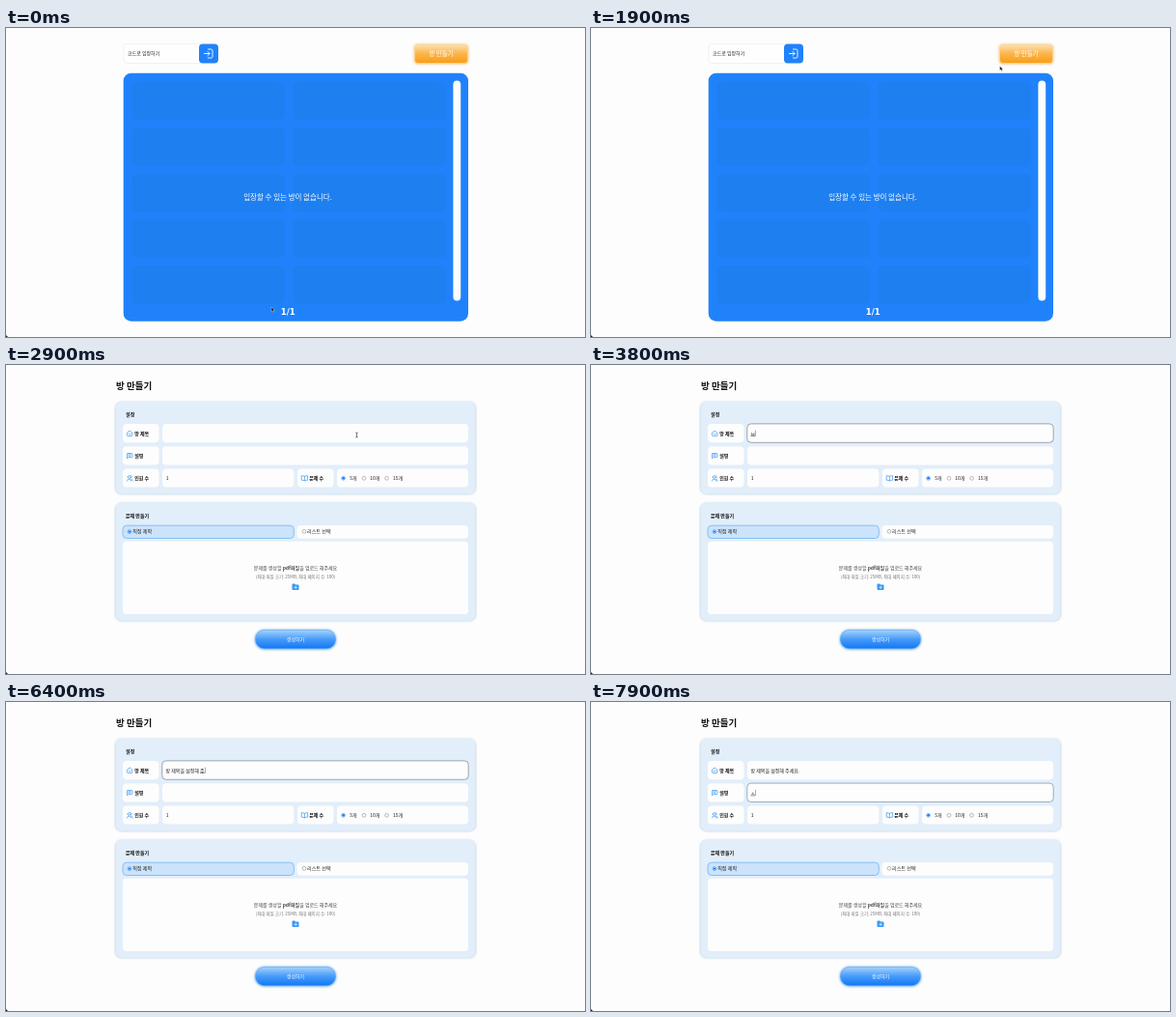
An HTML page that plays this animation: 600x320 px, repeating every 8000 ms.

```html
<!DOCTYPE html>
<html>
<head>
<meta charset="utf-8">
<style>
html, body { margin: 0; width: 100%; height: 100%; overflow: hidden; background: #fdfdfd; }
svg { display: block; width: 600px; height: 320px; }
text { font-family: "Noto Sans CJK KR", "Noto Sans CJK", "Noto Sans CJK JP", sans-serif; white-space: pre; }
</style>
</head>
<body>
<svg id="stage" viewBox="0 0 600 320">
  <defs>
    <linearGradient id="orange" x2="0" y2="1">
      <stop offset="0" stop-color="#fde0b0"/><stop offset=".45" stop-color="#fbb750"/><stop offset="1" stop-color="#f99c12"/>
    </linearGradient>
    <linearGradient id="blue" x2="0" y2="1">
      <stop offset="0" stop-color="#a5d2fc"/><stop offset=".5" stop-color="#469bf9"/><stop offset="1" stop-color="#1277f5"/>
    </linearGradient>
    <filter id="soft" x="-20%" y="-30%" width="140%" height="160%"><feGaussianBlur stdDeviation="1"/></filter>
  </defs>
  <g id="lobby"></g>
  <g id="form"></g>
  <g id="typed"></g>
  <path id="arrow" d="M0 0V4.6L1.1 3.7 1.9 5.3 2.7 4.9 2 3.4H3.4Z" fill="#111" stroke="#fff" stroke-width=".35"/>
  <path id="beam" d="M362.3 70q1.2 0 1.2 .7q0-.7 1.2-.7M363.5 70.7V74.3M362.3 75q1.2 0 1.2-.7q0 .7 1.2 .7" fill="none" stroke="#222" stroke-width=".6"/>
  <path d="M0 317.5Q.2 319.8 2.5 320H0Z"/>
</svg>
<script>
const $ = id => document.getElementById(id);
const box = (x, y, w, h, r, fill, more = '') =>
  `<rect x="${x}" y="${y}" width="${w}" height="${h}" rx="${r}" fill="${fill}" ${more}/>`;
// y is the vertical middle of the line
const label = (x, y, size, str, fill = '#222', weight = 400, anchor = 'start') =>
  `<text x="${x}" y="${y + size * .36}" font-size="${size}" fill="${fill}" font-weight="${weight}" text-anchor="${anchor}">${str}</text>`;
const icon = (x, y, d, color = '#3a96f3', width = .7) =>
  `<path transform="translate(${x} ${y})" d="${d}" fill="none" stroke="${color}" stroke-width="${width}" stroke-linecap="round" stroke-linejoin="round"/>`;
const radio = (x, y, on) => on
  ? `<circle cx="${x}" cy="${y}" r="1.9" fill="#fff" stroke="#2583f5" stroke-width=".6"/><circle cx="${x}" cy="${y}" r="1.2" fill="#1677f2"/>`
  : `<circle cx="${x}" cy="${y}" r="1.9" fill="#fff" stroke="#777" stroke-width=".5"/>`;
const white = '#fdfdfd';

function lobby() {
  let s = box(122, 16.5, 84, 20, 3, '#fefefe', 'stroke="#e9e9e9" stroke-width=".6"')
    + label(126, 26.5, 5, '코드로 입장하기')
    + box(200, 16.5, 20, 20, 4, '#2082fb')
    + icon(205.5, 22, 'M4 0H7Q8.5 0 8.5 1.5V7.5Q8.5 9 7 9H4M0 4.5H5.5M3.4 2.3 5.6 4.5 3.4 6.7', '#fff', .9)
    + box(422.5, 16.5, 57, 21, 4.5, '#f7c987', 'filter="url(#soft)"')
    + box(423.5, 17.5, 55, 19, 3.5, 'url(#orange)', 'stroke="#fdd99f" stroke-width=".8"')
    + label(451, 27, 6.4, '방 만들기', '#fff', 500, 'middle')
    + box(121.7, 46.7, 357.3, 257, 8, '#2082fb');
  for (let i = 0; i < 10; i++)
    s += box(130 + i % 2 * 167, 55.5 + (i >> 1) * 47.6, 158.7, 40, 6, '#1e7ff0');
  return s + box(463.4, 54.5, 7.8, 228, 3.9, white)
    + label(292, 175.5, 7.5, '입장할 수 있는 방이 없습니다.', '#fff', 500, 'middle')
    + `<text x="292.3" y="297.3" font-size="8.5" fill="#fff" text-anchor="middle" style="font:bold 8.5px 'DejaVu Sans',sans-serif">1/1</text>`;
}

function form() {
  const card = (y, h) => box(113, y, 374, h + .6, 7, '#c3d5e6', 'filter="url(#soft)"') + box(113.7, y, 372.6, h, 6.5, '#e2eefa');
  const field = (x, y, w, h = 19.2) => box(x, y, w, h, 4, white);
  const tag = (x, y, str, d) => field(x, y, 37.5) + icon(x + 4.2, y + 6.8, d) + label(x + 12.2, y + 9.7, 5, str, '#111', 700);
  let s = label(114, 22, 9.5, '방 만들기', '#111', 700)
    + card(38, 95.5) + label(124, 51, 5.1, '설정', '#111', 700)
    + tag(121, 61, '방 제목', 'M.3 2.4 3 .2 5.7 2.4V5Q5.7 5.8 5 5.8H1Q.3 5.8 .3 5ZM1.8 3.8Q3 4.8 4.2 3.8')
    + tag(121, 84.2, '설명', 'M1 .5H5Q5.8 .5 5.8 1.2V3.8Q5.8 4.5 5 4.5H2L.3 5.8V1.2Q.3 .5 1 .5ZM1.7 1.9H4.4M1.7 3.1H3.6')
    + tag(121, 107.4, '인원 수', 'M1 1.8A1.4 1.4 0 1 0 3.8 1.8 1.4 1.4 0 1 0 1 1.8M.2 5.8Q.4 4 2.4 4T4.6 5.8M4.4 .4Q6 1.8 4.4 3.1M5 4.1 6 5.8')
    + tag(302, 107.4, '문제 수', 'M3.2 1.2Q2 .4 0 .5V5Q2 4.9 3.2 5.7Q4.4 4.9 6.4 5V.5Q4.4 .4 3.2 1.2V5.6')
    + field(162, 61, 317) + field(162, 84.2, 317) + field(162, 107.4, 136.3) + field(343, 107.4, 136)
    + label(165.7, 117, 5, '1');
  [[349.6, '5개', 356.3], [371, '10개', 377.3], [394.5, '15개', 401]].forEach(([x, str, tx], i) =>
    s += radio(x, 117.3, !i) + label(tx, 117, 5, str));
  return s + card(142.7, 122) + label(124, 156, 5, '문제 만들기', '#111', 700)
    + box(121, 166.2, 177.3, 13.3, 4, '#cbe3fb', 'stroke="#72b7f6" stroke-width=".8"')
    + field(301.5, 166, 177.5, 13.7)
    + radio(128, 172.6, true) + label(131.2, 172.6, 5.1, '직접 제작')
    + radio(309, 172.3, false) + label(312, 172.6, 5.1, '리스트 선택')
    + field(121, 182.7, 358, 75.3)
    + label(300, 210, 5, '문제를 생성할 <tspan font-weight="700">pdf파일</tspan>을 업로드 해주세요', '#444', 400, 'middle')
    + label(300, 219.3, 4.5, '(최대 파일 크기: 25MB, 최대 페이지 수: 100)', '#777', 400, 'middle')
    + '<path d="M296.5 227.2q0-.7 .7-.7h2l.8 .9h2.7q.8 0 .8 .8v4q0 .8-.8 .8h-5.4q-.8 0-.8-.8z" fill="#379af5"/>'
    + icon(300.2, 229, 'M0 0V2.6M-1.3 1.3H1.3', '#fff', .6)
    + box(257.5, 273.7, 85, 21.3, 10, '#8dbdec', 'filter="url(#soft)"')
    + box(258.5, 274.5, 83, 19.2, 9, 'url(#blue)', 'stroke="#5aa9f8" stroke-width=".6"')
    + label(300, 284.3, 5, '생성하기', '#fff', 500, 'middle');
}

// Every state of a Hangul input method while a phrase is typed: [settled, composing]
const heads = 'ㄱㄲㄴㄷㄸㄹㅁㅂㅃㅅㅆㅇㅈㅉㅊㅋㅌㅍㅎ';
const tails = ' ㄱㄲㄳㄴㄵㄶㄷㄹㄺㄻㄼㄽㄾㄿㅀㅁㅂㅄㅅㅆㅇㅈㅊㅋㅌㅍㅎ';
function keystrokes(phrase) {
  const states = [['', '']];
  let done = '', open = null;
  for (const ch of phrase) {
    const code = ch.charCodeAt(0) - 0xac00;
    if (code < 0) {
      done += ch;
      open = null;
      states.push([done, '']);
      continue;
    }
    const head = heads[Math.floor(code / 588)], tail = code % 28;
    const bare = String.fromCharCode(0xac00 + code - tail);
    // an open syllable first takes the next consonant as its own tail
    states.push(open
      ? [done.slice(0, -1), String.fromCharCode(open.charCodeAt(0) + tails.indexOf(head))]
      : [done, head]);
    states.push([done, bare]);
    if (tail) states.push([done, ch]);
    done += ch;
    open = tail ? null : ch;
  }
  return states;
}
const title = keystrokes('방 제목을 설정해 주세요.');
const about = keystrokes('설');

const path = [[0, 275, 289], [400, 277, 293], [700, 278, 291], [900, 279, 288], [1300, 290, 210], [1700, 324.5, 86],
  [1900, 423.5, 39.5], [2050, 445, 27], [2400, 445, 27], [2600, 410, 48], [2750, 363, 71], [2900, 362.5, 71]];
function pointer(t) {
  const i = Math.max(1, path.findIndex(p => p[0] > t)), [a, b] = [path[i - 1], path[i]];
  const k = (t - a[0]) / (b[0] - a[0]);
  return [a[1] + (b[1] - a[1]) * k, a[2] + (b[2] - a[2]) * k];
}

const entry = (y, [done, open]) =>
  label(165.5, y, 5, `${done}<tspan text-decoration="underline">${open}</tspan>`);

function draw(t) {
  const onForm = t >= 2850, focus = t >= 7150 ? 2 : t >= 3500 ? 1 : 0;
  $('lobby').style.display = $('arrow').style.display = onForm ? 'none' : '';
  $('form').style.display = $('typed').style.display = onForm ? '' : 'none';
  $('beam').style.display = onForm && t < 3800 ? '' : 'none';
  if (!onForm) return $('arrow').setAttribute('transform', `translate(${pointer(t)})`);

  const keys = t < 4860 ? (t - 3800) / 177 + 1 : (t - 4860) / 89 + 7;
  const n = Math.max(0, Math.min(title.length - 1, Math.floor(keys)));
  const row = focus === 2 ? 84.2 : 61;
  $('typed').innerHTML = (focus ? box(161.8, row - .1, 317.4, 19.4, 4, white, `stroke="${focus === 2 ? '#879bb5' : '#8b9199'}" stroke-width=".8"`) : '')
    + entry(70.7, focus === 2 ? [title[n].join(''), ''] : title[n])
    + entry(93.9, about[t >= 7850 ? 1 : 0]);
  if (focus) {
    const x = 165.8 + $('typed').querySelectorAll('text')[focus - 1].getComputedTextLength();
    $('typed').innerHTML += box(x, row + 6.6, .4, 6.2, 0, '#333');
  }
}

$('lobby').innerHTML = lobby();
$('form').innerHTML = form();
const start = performance.now();
(function tick() {
  draw((performance.now() - start) % 8000);
  requestAnimationFrame(tick);
})();
</script>
</body>
</html>
```
